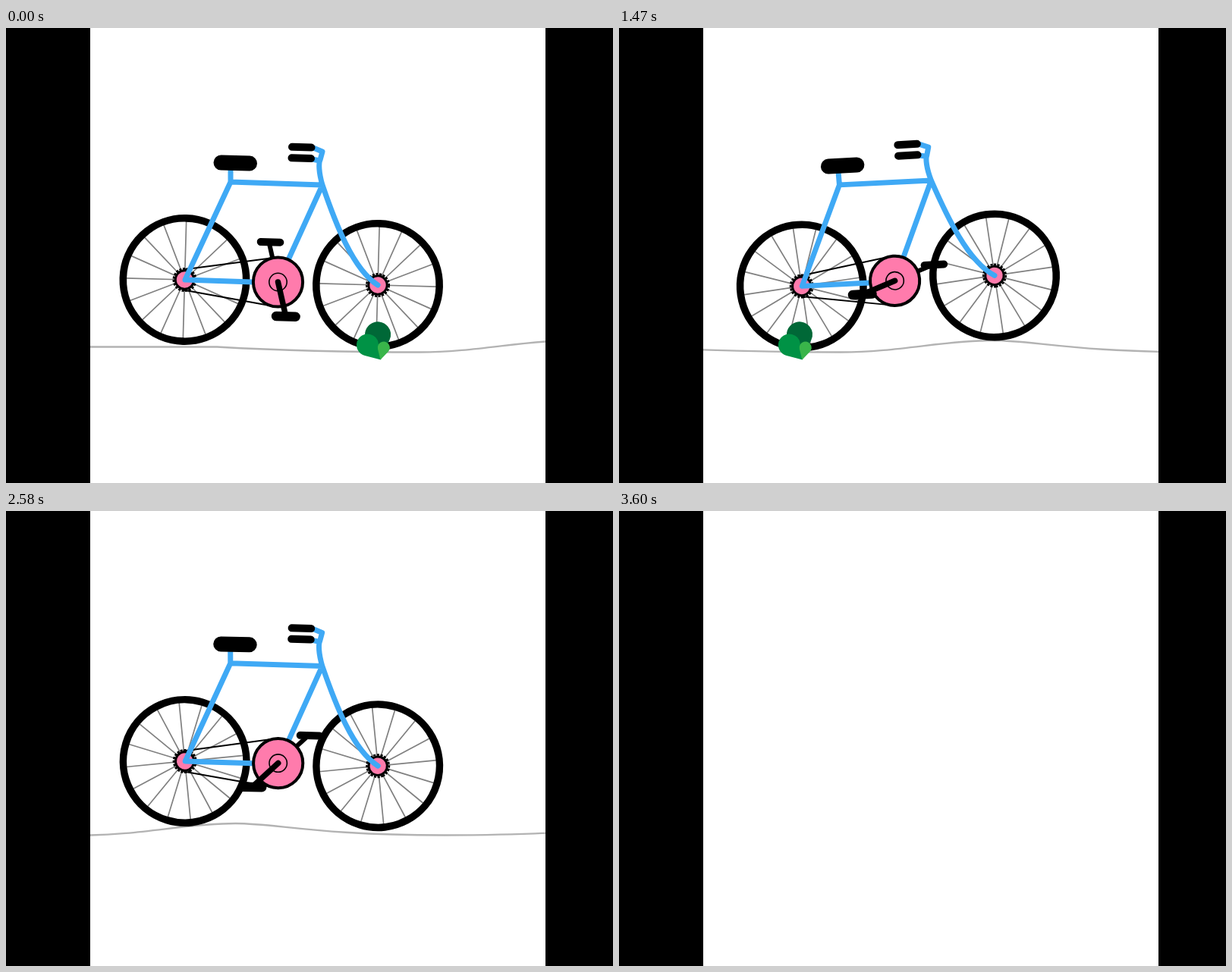
An HTML page with a canvas for the animation above (3.63 s loop, 800 by 600 pixels).

```html
<!DOCTYPE html>
<html>
<head>
<meta charset="utf-8">
<title>Bicycle ride</title>
<style>
  html, body { margin: 0; width: 100%; height: 100%; overflow: hidden; background: #000; }
  canvas { display: block; }
</style>
</head>
<body>
<canvas id="stage" width="800" height="600"></canvas>
<script>
const ctx = document.getElementById('stage').getContext('2d');
const LOOP = 3630, STEP = 30, RIDE_END = 3600;
const SCROLL = 0.1715;                       // px per ms
const SPIN = 6 * Math.PI / 3570;             // three turns per ride
const DEG = Math.PI / 180;
const BLUE = '#3fa9f5', PINK = '#ff7bac', GREEN = '#009245', DARK = '#006837', LIGHT = '#39b54a';
const REAR = [235.5, 332], FRONT = [490, 339], CRANK = [358.5, 335], PIVOT = [364.5, 273];

// time, tilt in degrees, lift in px
const POSES = [
  [0, 0, 0], [420, 0, 0], [930, -2.69, -2.2], [1470, -4.72, -2],
  [2160, -1.91, -2.2], [3030, 1.69, -2.7], [3570, 0, 0]
];

const GROUND = new Path2D('M0 420.5H278C340 424 450 427.5 545 427.5C620 427.5 680 412 745 412' +
  'C800 412 850 427.5 1020 427.5C1100 427.5 1160 426 1215 420H1500');
const FRAME = new Path2D('M325 335L236 332L296 203V186M296 203L417 207L360 332' +
  'M490 339C457 318 434 257 417 207C412 190 412 178 414 174L417 163L405 158M413 175L404 173');

function pose(t) {
  const i = Math.max(1, POSES.findIndex(p => p[0] >= t));
  const [t0, a0, y0] = POSES[i - 1], [t1, a1, y1] = POSES[i];
  const k = (t - t0) / (t1 - t0);
  return [a0 + (a1 - a0) * k, y0 + (y1 - y0) * k];
}

function stroke(path, color, width) {
  ctx.strokeStyle = color;
  ctx.lineWidth = width;
  ctx.stroke(path);
}

function line(x1, y1, x2, y2, width, color = '#000') {
  const path = new Path2D();
  path.moveTo(x1, y1);
  path.lineTo(x2, y2);
  stroke(path, color, width);
}

function circle(x, y, r, width, fill) {
  const path = new Path2D();
  path.arc(x, y, r, 0, 2 * Math.PI);
  if (fill) {
    ctx.fillStyle = fill;
    ctx.fill(path);
  }
  stroke(path, '#000', width);
}

// Round leaf whose sides run tangentially to a tip
function leaf(x, y, r, tipX, tipY, color) {
  const dir = Math.atan2(tipY - y, tipX - x);
  const open = Math.acos(r / Math.hypot(tipX - x, tipY - y));
  ctx.beginPath();
  ctx.arc(x, y, r, dir + open, dir - open + 2 * Math.PI);
  ctx.lineTo(tipX, tipY);
  ctx.fillStyle = color;
  ctx.fill();
}

function wheel([x, y], turn) {
  ctx.save();
  ctx.translate(x, y);
  ctx.rotate(turn + 1.6 * DEG);
  for (let i = 0; i < 16; i++) {
    ctx.rotate(Math.PI / 8);
    line(0, 0, 78, 0, 1.7, '#808080');
  }
  circle(0, 0, 81.2, 9.6);
  circle(0, 0, 12.2, 3, PINK);
  ctx.lineCap = 'butt';
  ctx.setLineDash([3.1, 1.6]);
  circle(0, 0, 14.7, 2.6);
  ctx.restore();
}

function pedal(angle, armStart, armEnd, reach, shift, armWidth, width) {
  const c = Math.cos(angle), s = Math.sin(angle);
  const [x, y] = CRANK;
  line(x + c * armStart, y + s * armStart, x + c * armEnd, y + s * armEnd, armWidth);
  const px = x + c * reach + shift, py = y + s * reach;
  line(px - 12.8, py - 0.35, px + 12.8, py + 0.35, width);
}

function bike(t) {
  const [tilt, lift] = pose(t);
  const turn = t * SPIN, crank = turn + 77.2 * DEG;
  ctx.save();
  ctx.translate(PIVOT[0], PIVOT[1] + lift);
  ctx.rotate(tilt * DEG);
  ctx.translate(-PIVOT[0], -PIVOT[1]);
  wheel(REAR, turn);
  wheel(FRONT, turn);
  line(234, 318.5, 353, 303, 2);
  line(234, 345.5, 353, 367, 2);
  pedal(crank + Math.PI, 30, 50, 54, 2, 6, 10);
  stroke(FRAME, BLUE, 7);
  line(283.5, 177.6, 321, 178.6, 20);
  line(377, 156.8, 402.5, 157.6, 10);
  line(376.5, 171.3, 402, 172.1, 10);
  circle(...CRANK, 32.6, 4, PINK);
  circle(...CRANK, 11.7, 1.6);
  pedal(crank, 0, 44, 46.5, 0, 7.5, 12.5);
  ctx.restore();
}

function draw(now) {
  const t = Math.floor(now % LOOP / STEP) * STEP;
  ctx.fillStyle = '#000';
  ctx.fillRect(0, 0, 800, 600);
  ctx.save();
  ctx.beginPath();
  ctx.rect(111, 0, 600, 600);
  ctx.clip();
  ctx.fillStyle = '#fff';
  ctx.fillRect(111, 0, 600, 600);
  if (t < RIDE_END) {
    ctx.lineCap = ctx.lineJoin = 'round';
    ctx.save();
    ctx.translate(-t * SCROLL, 0);
    stroke(GROUND, '#b3b3b3', 2.4);
    ctx.restore();
    bike(t);
    ctx.translate(-t * SCROLL, 0);
    leaf(490, 404.3, 17, 494, 437, DARK);
    leaf(476.5, 418, 14.5, 494, 437.5, GREEN);
    leaf(497.8, 421.5, 8, 493.5, 437.5, LIGHT);
    leaf(1181.6, 349.7, 12.3, 1175.5, 372, GREEN);
    leaf(1172, 358.8, 7.2, 1175.5, 372.5, LIGHT);
  }
  ctx.restore();
  requestAnimationFrame(draw);
}
requestAnimationFrame(draw);
</script>
</body>
</html>
```
